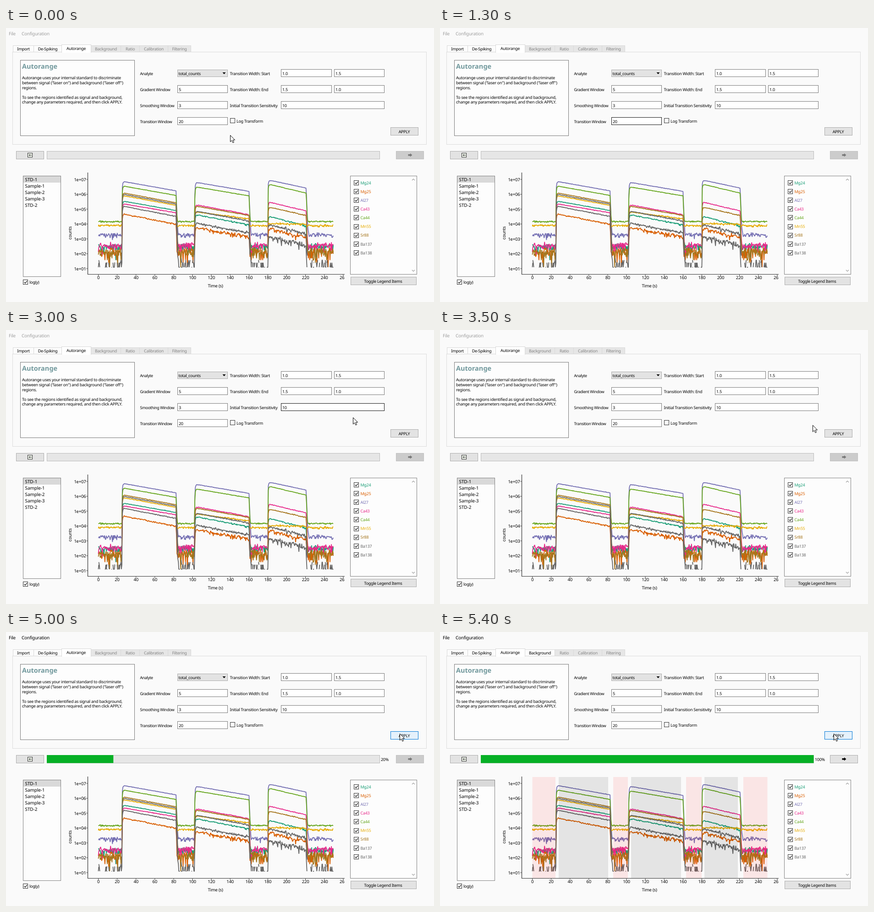
These frames come from a looping animation (934x599 px, 8400 ms). An HTML page:

```html
<!DOCTYPE html>
<html lang="en">
<head>
<meta charset="utf-8">
<title>Autorange</title>
<style>
html, body { margin: 0; width: 100%; height: 100%; overflow: hidden; background: #fafafa; }
svg { display: block; }
text { font: 9px "Noto Sans", "Open Sans", sans-serif; letter-spacing: -.3px; text-rendering: geometricPrecision; white-space: pre; }
text.body { letter-spacing: -.25px; }
text.tight { font-size: 8.8px; letter-spacing: -.4px; }
text.big { font-size: 10px; }
text.list { font-size: 10px; letter-spacing: -.1px; }
text.axis { font-size: 9.5px; letter-spacing: -.2px; }
text.title { font-size: 14.5px; font-weight: 700; letter-spacing: 0; }
.timed { animation: 8400ms step-end -20ms infinite; }
</style>
</head>
<body>
<svg id="stage" width="934" height="599" viewBox="0 0 934 599"></svg>
<script>
const LOOP = 8400;
const stage = document.getElementById('stage');
const sheet = document.head.appendChild(document.createElement('style'));
const pct = ms => (ms / LOOP * 100).toFixed(4) + '%';
let layer = stage;
let names = 0;

function add(tag, attrs, content) {
  const el = document.createElementNS('http://www.w3.org/2000/svg', tag);
  for (const key in attrs) el.setAttribute(key, attrs[key]);
  if (content !== undefined) el.textContent = content;
  return layer.appendChild(el);
}
const box = (x, y, w, h, fill, stroke) =>
  add('rect', { x: x + .5, y: y + .5, width: w, height: h, fill, stroke });
const fillRect = (x, y, width, height, fill) => add('rect', { x, y, width, height, fill });
const line = (d, stroke, width = 1) =>
  add('path', { d, stroke, fill: 'none', 'stroke-width': width });
const label = (x, y, str, fill = '#000', cls = '', anchor = 'start') =>
  add('text', { x, y, fill, class: cls, 'text-anchor': anchor }, str);

function group(draw) {
  const outer = layer;
  const g = layer = add('g', {});
  draw();
  layer = outer;
  return g;
}

function animate(el, frames) {
  const name = 'a' + names++;
  sheet.textContent += `@keyframes ${name}{${frames}}\n`;
  el.classList.add('timed');
  el.style.animationName = name;
}

// Content is visible only in the given [from, to] spans.
function during(spans, draw) {
  let frames = '0%{opacity:0}';
  for (const [from, to] of spans)
    frames += `${pct(from)}{opacity:1}` + (to < LOOP ? `${pct(to)}{opacity:0}` : '');
  frames += `100%{opacity:${spans[spans.length - 1][1] < LOOP ? 0 : 1}}`;
  const g = group(draw);
  animate(g, frames);
  return g;
}

function check(x, y, on) {
  box(x, y, 10, 10, '#fff', '#333');
  if (on) line(`M${x + 2.5} ${y + 5.5}l2.3 2.5 4.2-5`, '#222', 1.2);
}

// Menu bar
function menu(color) {
  label(6, 16, 'File', color, 'big');
  label(34, 16, 'Configuration', color, 'big');
}
during([[0, 4700]], () => menu('#a0a0a0'));
during([[4700, LOOP]], () => menu('#000'));

// Tabs
box(14, 52, 903, 202, '#fafafa', '#dcdcdc');
function tab(x, end, name, on) {
  box(x, 38, end - x, 14, on ? '#fcfcfc' : '#e6e6e6', '#d9d9d9');
  label((x + end) / 2 + .5, 49, name, on ? '#000' : '#838383', '', 'middle');
}
tab(15, 60, 'Import', true);
tab(60, 121, 'De-Spiking', true);
tab(250, 291, 'Ratio');
tab(291, 353, 'Calibration');
tab(353, 403, 'Filtering');
during([[0, 5400]], () => tab(185, 250, 'Background'));
during([[5400, LOOP]], () => tab(185, 250, 'Background', true));
box(121, 36, 64, 17, '#fff', '#d9d9d9');
fillRect(122, 52, 63, 2, '#fff');
label(153, 48, 'Autorange', '#000', '', 'middle');

// Description
box(31, 70, 249, 165, '#fdfdfd', '#7a7a7a');
label(35, 89, 'Autorange', '#72999d', 'title');
[
  [111.5, 'Autorange uses your internal standard to discriminate'],
  [122.5, 'between signal ("laser on") and background ("laser off")'],
  [133.5, 'regions.'],
  [154.5, 'To see the regions identified as signal and background,'],
  [165, 'change any parameters required, and then click APPLY.']
].forEach(([y, str]) => label(35, y, str, '#000', 'body'));

// Form
const rows = [90, 125, 160, 195];
['Analyte', 'Gradient Window', 'Smoothing Window', 'Transition Window']
  .forEach((str, i) => label(292.5, rows[i] + 12.5, str, '#000', 'tight'));
['Transition Width: Start', 'Transition Width: End', 'Initial Transition Sensitivity']
  .forEach((str, i) => label(488.5, rows[i] + 12.5, str));

function field(x, row, w, value, ...hover) {
  const y = rows[row];
  box(x, y, w, 16, '#fff', '#7a7a7a');
  if (hover.length) during([hover], () => box(x, y, w, 16, 'none', '#171717'));
  label(x + 3, y + 12.5, value);
}
field(374, 1, 109, '5', 900, 1100);
field(374, 2, 109, '3', 1100, 1300);
field(374, 3, 109, '20', 1300, 1800);
field(600, 0, 110, '1.0', 2100, 2600);
field(716, 0, 109, '1.5', 2200, 2600);
field(600, 1, 110, '1.5', 2500, 2700);
field(716, 1, 109, '1.0');
field(600, 2, 225, '10', 2700, 3200);

box(374, 91, 109, 15, '#e3e3e3', '#adadad');
during([[500, 900]], () => box(374, 91, 109, 15, '#e5f1fb', '#0078d7'));
label(376.5, 102.5, 'total_counts');
add('path', { d: 'M472.5 97h7l-3.5 4z', fill: '#000' });
check(489, 197);
label(503, 207, 'Log Transform');

function apply(fill, stroke) {
  box(839, 217, 60, 17, fill, stroke);
  label(869, 230, 'APPLY', '#000', '', 'middle');
}
apply('#e3e3e3', '#adadad');
during([[3800, LOOP]], () => apply('#e5f1fb', '#0078d7'));
during([[4700, 4800]], () => apply('#cce4f7', '#005499'));

// Navigation and progress
box(22, 269, 60, 17, '#e3e3e3', '#adadad');
box(47, 273, 10, 9, '#eef3ea', '#333');
line('M50 278h6M52.3 276l-2.3 2 2.3 2', '#222');
function next(fill, stroke, ink) {
  box(851, 269, 60, 17, fill, stroke);
  add('path', { d: 'M877.5 276h4.5v-2l4.5 3.7-4.5 3.8v-2h-4.5z', fill: ink });
}
during([[0, 5400]], () => next('#cccccc', '#bfbfbf', '#777'));
during([[5400, LOOP]], () => next('#e3e3e3', '#adadad', '#000'));

box(89, 269, 726, 17, '#e6e6e6', '#bcbcbc');
[20, 60, 80, 100].forEach((value, i) => {
  const from = 5000 + i * 100;
  during([[from, value < 100 ? from + 100 : LOOP]], () => {
    fillRect(89, 269, 7.265 * value, 17.5, '#06b025');
    label(818, 281.5, value + '%');
  });
});

// Sample list
box(37, 323, 82, 220, '#fdfdfd', '#828282');
fillRect(38, 324, 81, 14, '#d9d9d9');
['STD-1', 'Sample-1', 'Sample-2', 'Sample-3', 'STD-2']
  .forEach((str, i) => label(41.5, 335 + i * 14.1, str, '#000', 'list'));
check(37, 550, true);
label(51, 559, 'log(y)');

// Chart
const X0 = 201.5, PER_SEC = 2.055, DECADE = 32.5, ONE = 523;
const PULSES = [[25.2, 82.5], [102.4, 160], [180, 220.7]];
// name, colour, resting height, then start and end height of each pulse
const SERIES = [
  ['Mg24', '#1b9e77', 478, 378, 399, 408, 430, 411, 433],
  ['Mg25', '#d95f02', 490, 406, 429, 436, 457, 438, 459],
  ['Al27', '#7570b3', 452, 335, 356, 337, 357, 332, 350],
  ['Ca43', '#e7298a', 475, 384, 404, 386, 408, 380, 400],
  ['Ca44', '#66a61e', 423, 345, 366, 347, 367, 341, 361],
  ['Mn55', '#e6ab02', 432, 366, 388, 402, 418, 429, 432.5],
  ['Sr88', '#a6761d', 490, 360, 382, 389, 410, 391, 410],
  ['Ba137', '#666666', 530, 389, 412, 426, 448, 456, 475],
  ['Ba138', '#666666', 526, 363, 385, 400, 422, 429, 450]
];

let seed = 41;
function rand() {
  seed = seed + 0x6D2B79F5 | 0;
  let v = Math.imul(seed ^ seed >>> 15, 1 | seed);
  v = v + Math.imul(v ^ v >>> 7, 61 | v) ^ v;
  return ((v ^ v >>> 14) >>> 0) / 4294967296;
}
const gauss = () => (rand() + rand() + rand() + rand() - 2) * 1.73;
const counts = y => 10 ** ((ONE - y) / DECADE);

function trace([, , rest, ...heights]) {
  const base = counts(rest);
  let d = '', pen = 'M';
  for (let s = 0; s <= 249.5; s += .5) {
    let c = base;
    PULSES.forEach(([on, off], i) => {
      if (s <= on) return;
      const [a, b] = heights.slice(i * 2);
      const k = (Math.min(s, off) - on) / (off - on);
      const rise = 1 - Math.exp(-(s - on) / .65);
      const fall = 10 ** (-1.6 * Math.max(0, s - off));
      c += (counts(a + (b - a) * k) - base * .8) * rise * fall;
    });
    const spread = Math.min(2.4, 1.4 + c / 100);
    const n = Math.round(c + spread * Math.sqrt(c) * gauss());
    if (n < 1) { pen = 'M'; continue; }
    const y = ONE - DECADE * Math.log10(n) + (n > 40 ? gauss() * .25 : 0);
    d += pen + (X0 + s * PER_SEC).toFixed(1) + ' ' + y.toFixed(1);
    pen = 'L';
  }
  return d;
}
SERIES.forEach(s => line(trace(s), s[1], 1.8).setAttribute('stroke-linejoin', 'bevel'));

during([[5400, LOOP]], () => {
  [[201.5, 252], [378, 410], [537, 571], [662, 714.5]]
    .forEach(([a, b]) => fillRect(a, 317, b - a, 221, 'rgba(255,30,30,.09)'));
  [[259, 367], [417, 526], [577, 650]]
    .forEach(([a, b]) => fillRect(a, 317, b - a, 221, 'rgba(0,0,0,.085)'));
});

line('M178.5 316V538.5H739', '#333', 1.2);
for (let i = 1; i <= 7; i++) {
  const y = 331 + (7 - i) * DECADE;
  line(`M175 ${y}h3`, '#555');
  label(174.5, y + 3.5, '1e+0' + i, '#000', 'axis', 'end');
}
add('clipPath', { id: 'edge' }).append(fillRect(178, 530, 561, 30, '#000'));
const ticks = group(() => {
  for (let s = 0; s <= 260; s += 20) {
    const x = X0 + s * PER_SEC;
    line(`M${x} 539v3`, '#555');
    label(x, 548.5, s, '#000', 'axis', 'middle');
  }
});
ticks.setAttribute('clip-path', 'url(#edge)');
label(457, 567, 'Time (s)', '#000', 'axis', 'middle');
label(0, 0, 'counts', '#000', 'axis', 'middle').setAttribute('transform', 'translate(143 448) rotate(-90)');

// Legend
box(751, 323, 145, 215, '#fdfdfd', '#828282');
SERIES.forEach(([name, color], i) => {
  const y = 338 + i * 19.1;
  check(759, Math.round(y) - 5, true);
  label(773.5, y + 3.8, name, color);
});
line('M886 333l3-3 3 3M886 529l3 3 3-3', '#a0a0a0', 1.2);
box(752, 544, 143, 17, '#e3e3e3', '#adadad');
label(823, 556.5, 'Toggle Legend Items', '#000', '', 'middle');

// Pointer, unseen while it is over a text field
const pointer = during([[0, 900], [1400, 1500], [1800, 2100], [2500, 2600], [2800, LOOP]], () =>
  add('path', {
    d: 'M.5.5V14.8L3.8 11.7 6 16.9 8.4 15.9 6.2 10.8H10.6Z',
    fill: '#fff', stroke: '#000', 'stroke-width': 1
  }));
const MOVES = [
  [0, 489, 234], [600, 450, 98], [900, 446, 128], [1300, 444, 205], [1400, 444, 212],
  [1500, 444, 204], [1700, 444, 200], [2100, 620, 100], [2200, 765, 100], [2400, 695, 136],
  [2500, 690, 145], [2600, 700, 165], [3000, 757, 191], [3200, 790, 200], [3300, 790, 200],
  [3900, 859, 223], [4000, 859, 223], [4100, 859, 222], [LOOP, 859, 222]
];
const holder = add('g', {});
holder.append(pointer);
animate(holder, MOVES.map(([t, x, y], i) => {
  const span = i + 1 < MOVES.length ? (MOVES[i + 1][0] - t) / 100 : 1;
  return `${pct(t)}{transform:translate(${x}px,${y}px);animation-timing-function:steps(${span})}`;
}).join(''));
</script>
</body>
</html>
```
